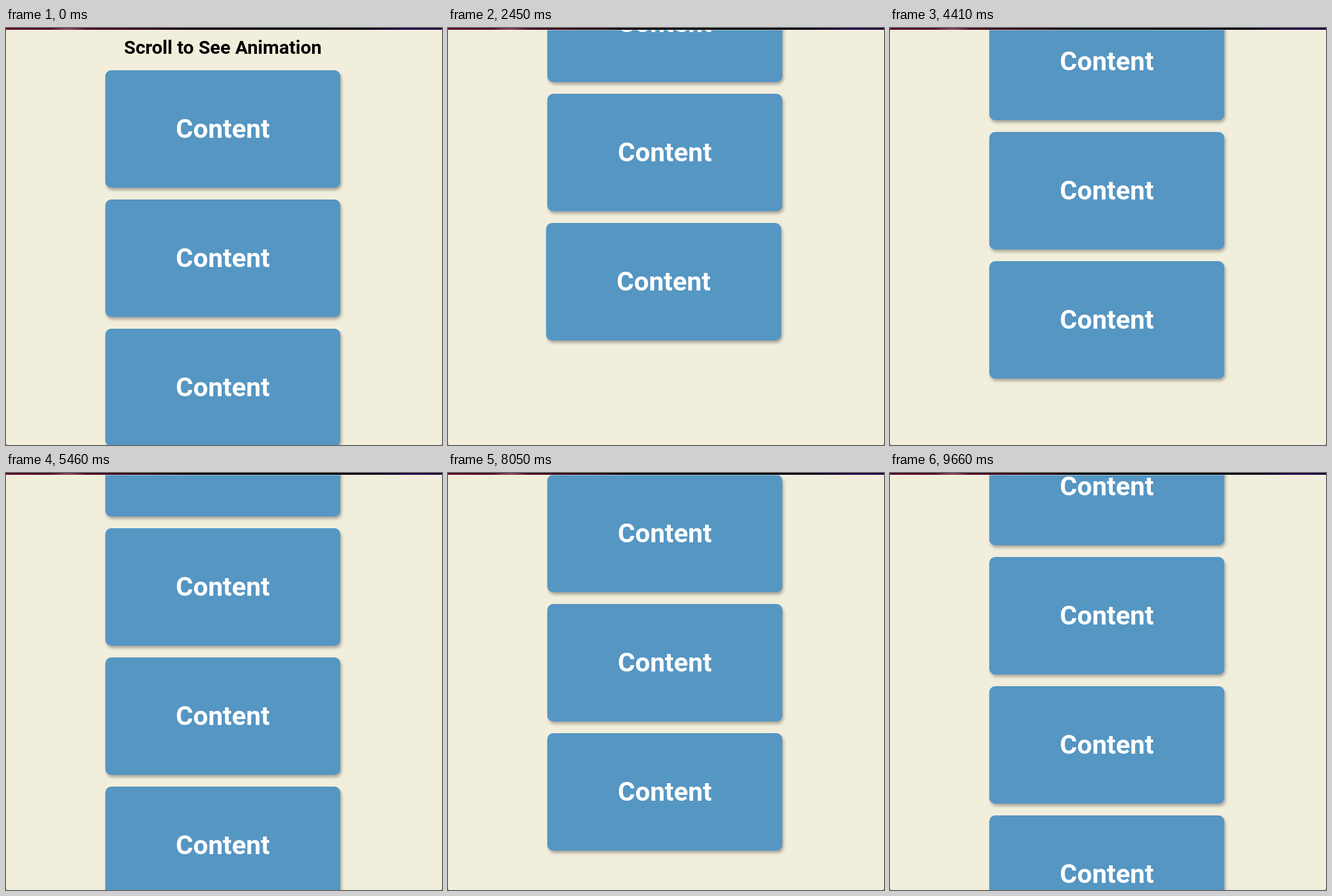
An HTML page for the animation above (9.73 s loop, 742 by 710 pixels).

```html
<!DOCTYPE html>
<html lang="en">
<head>
<meta charset="utf-8">
<title>Scroll Animation</title>
<style>
  html, body { margin: 0; width: 100%; height: 100%; overflow: hidden; background: #1b1a1e; }
  #stage { position: absolute; left: 0; top: 0; width: 742px; height: 710px; overflow: hidden; }
  #strip {
    position: absolute; left: 0; top: 0; width: 742px; height: 4px;
    background:
      radial-gradient(ellipse 34px 6px at 106px 0, rgba(190, 120, 140, .65), transparent),
      linear-gradient(90deg, #5c0322, #4a041c 20%, #2c0014 34%, #080005 42%, #000 70%, #0a0018 84%, #24004c 93%, #1a0338);
  }
  #view {
    position: absolute; left: 0; top: 3px; width: 742px; height: 707px;
    overflow: hidden; background: #f2eedc; border-radius: 0 0 2px 2px;
  }
  #edge { position: absolute; left: 0; top: 0; width: 742px; height: 1px; background: rgba(235, 228, 222, .6); }
  #page { position: absolute; left: 0; top: -3px; width: 738px; font-family: Roboto, Arial, sans-serif; font-weight: 700; }
  h1 { position: absolute; left: 0; top: 14px; width: 738px; margin: 0; font-size: 32px; line-height: 38px; text-align: center; color: #000; }
  .box {
    position: absolute; left: 169px; width: 400px; height: 200px; border-radius: 10px;
    background: #5596c3; color: #fff; font-size: 45px; line-height: 200px; text-align: center;
    box-shadow: 2px 4px 5px rgba(0, 0, 0, .3);
  }
</style>
</head>
<body>
<div id="stage">
  <div id="strip"></div>
  <div id="view">
    <div id="page"><h1>Scroll to See Animation</h1></div>
    <div id="edge"></div>
  </div>
</div>
<script>
const LOOP = 9730, TICK = 70;
const COUNT = 13, FIRST = 72, PITCH = 220;
const TRIGGER = 569, LAG = 20, SLIDE = 400, AWAY = 1600;

// [time in ms, scroll offset in px]
const KEYS = [
  [0, 0], [280, 150], [560, 310], [910, 400], [1050, 400],
  [1330, 660], [1610, 790], [1750, 790], [1820, 805],
  [2100, 1090], [2400, 1265], [2660, 1320], [2870, 1320],
  [3150, 1362], [3220, 1362], [3640, 1680], [4000, 1840], [4200, 1880], [4340, 1880],
  [4800, 1750], [5460, 1518], [6000, 1180], [6400, 960], [6700, 868],
  [6913, 823], [7000, 807], [7300, 690], [7600, 590], [8050, 509],
  [8820, 470], [8890, 470], [9200, 400], [9450, 310], [9590, 230], [9660, 149], [9730, 60]
];

const grade = KEYS.slice(1).map(([t, s], i) => (s - KEYS[i][1]) / (t - KEYS[i][0]));
const slope = KEYS.map((_, i) => {
  const a = grade[i - 1], b = grade[i];
  if (a === undefined) return b;
  if (b === undefined) return a;
  return a * b > 0 ? 2 * a * b / (a + b) : 0;
});

function scrollAt(t) {
  let i = 0;
  while (i < KEYS.length - 2 && t >= KEYS[i + 1][0]) i++;
  const [t0, s0] = KEYS[i], [t1, s1] = KEYS[i + 1];
  const h = t1 - t0, u = (t - t0) / h, v = 1 - u;
  return s0 * v * v * (1 + 2 * u) + s1 * u * u * (3 - 2 * u)
    + h * u * v * (slope[i] * v - slope[i + 1] * u);
}

// cubic-bezier(.25, .1, .25, 1)
function ease(x) {
  if (x <= 0) return 0;
  if (x >= 1) return 1;
  let lo = 0, hi = 1;
  for (let n = 0; n < 24; n++) {
    const u = (lo + hi) / 2;
    if (.75 * u * (1 - u) + u * u * u < x) lo = u; else hi = u;
  }
  return .3 * lo * (1 - lo) ** 2 + 3 * lo * lo * (1 - lo) + lo ** 3;
}

const topOf = i => FIRST + PITCH * i;
const slideAt = (m, t) => m.from + (m.to - m.from) * ease((t - m.start) / SLIDE);

// Each box keeps the list of slides set off by crossing the trigger line.
function findMoves(i) {
  const shown = t => topOf(i) - scrollAt(t) < TRIGGER ? 1 : 0;
  const first = shown(0);
  const moves = [{ start: -SLIDE, from: first, to: first }];
  for (let t = 0; t < LOOP; t++) {
    const last = moves[moves.length - 1], to = shown(t);
    if (to !== last.to) moves.push({ start: t + LAG, from: slideAt(last, t + LAG), to });
  }
  return moves;
}

const page = document.getElementById("page");
const boxes = Array.from({ length: COUNT }, (_, i) => {
  const el = document.createElement("div");
  el.className = "box";
  el.textContent = "Content";
  el.style.top = topOf(i) + "px";
  page.append(el);
  return { el, side: i % 2 ? -AWAY : AWAY, moves: findMoves(i) };
});

function draw(t) {
  page.style.transform = `translateY(${-Math.round(scrollAt(t))}px)`;
  for (const { el, side, moves } of boxes) {
    let move = moves[0];
    for (const m of moves) if (m.start <= t) move = m;
    el.style.transform = `translateX(${Math.round(side * (1 - slideAt(move, t)))}px)`;
  }
}

const begin = performance.now();
function frame() {
  const t = (performance.now() - begin) % LOOP;
  draw(Math.floor(t / TICK) * TICK);
  requestAnimationFrame(frame);
}
draw(0);
requestAnimationFrame(frame);
</script>
</body>
</html>
```
